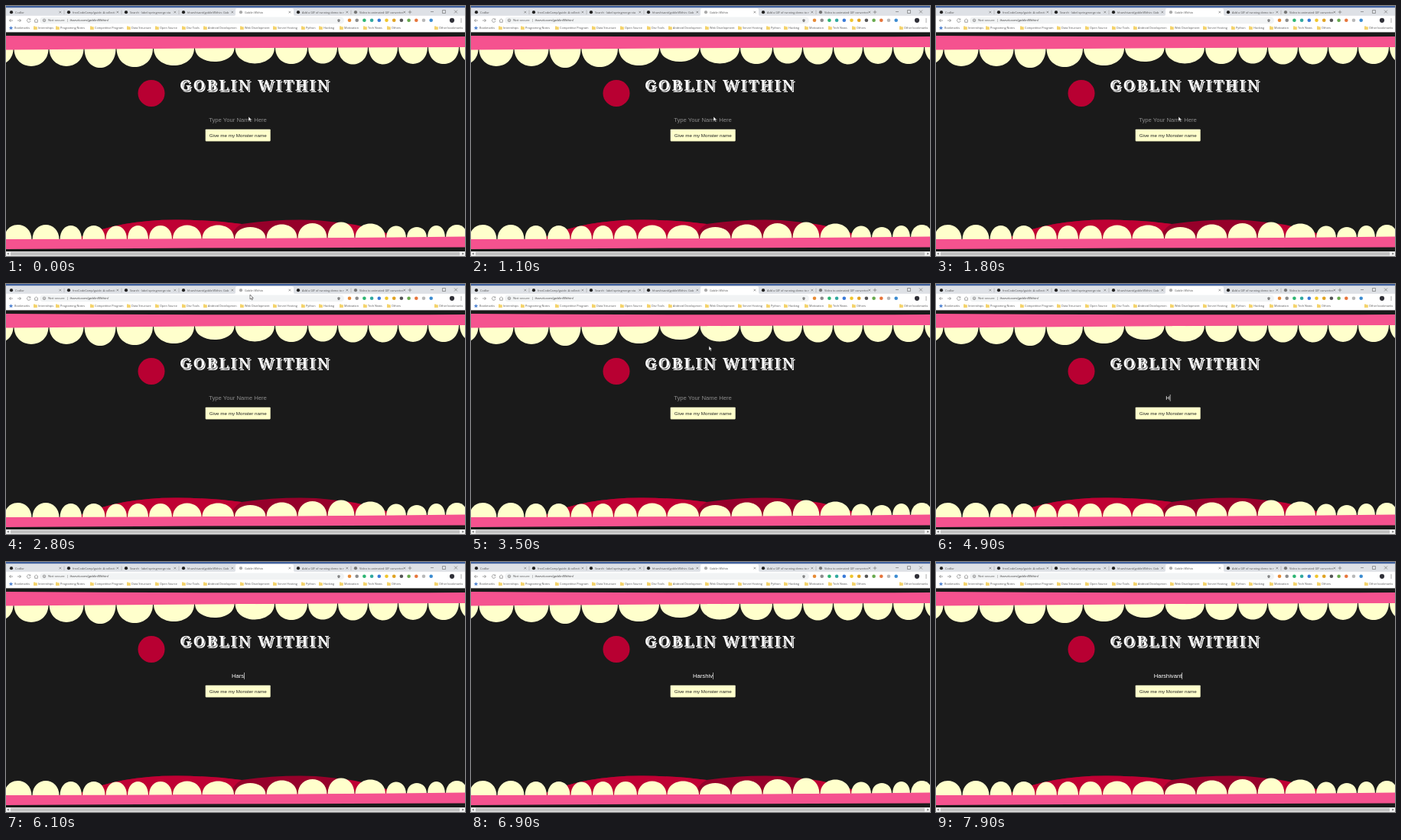
An HTML page for the animation above (8000 ms loop, 600x328 px).

```html
<!DOCTYPE html>
<html lang="en">
<head>
<meta charset="utf-8">
<title>Goblin Within</title>
<style>
  html, body { margin: 0; width: 100%; height: 100%; overflow: hidden; background: #1a1a1a; }
  svg { display: block; width: 100%; height: 100%; font-family: "Liberation Sans", Arial, sans-serif; }
  .ui { font-family: "Open Sans", "Noto Sans", sans-serif; font-size: 3.8px; fill: #555; }
  .title { font: 900 20px "Noto Serif", serif; letter-spacing: 2.2px; fill: #fff; }
  .title .face { stroke: #1a1a1a; stroke-width: 1; paint-order: stroke; }
  .field { font-size: 7.7px; text-anchor: middle; }
  .line { fill: none; stroke: #666; stroke-width: .6; }
</style>
</head>
<body>
<svg viewBox="0 0 600 328" preserveAspectRatio="none">
  <rect width="600" height="328" fill="#1a1a1a"/>

  <g id="browser">
    <rect width="600" height="13" fill="#dee1e6"/>
    <rect width="600" height="2.2" fill="#41629f"/>
    <path d="M298 13Q300 13 300 11V5Q300 3 302 3H374Q376 3 376 5V11Q376 13 378 13Z" fill="#fff"/>
    <rect y="12.8" width="600" height="21.6" fill="#fff"/>
    <rect x="44" y="14.4" width="398" height="8.8" rx="4.4" fill="#f1f3f4"/>
    <path class="line" d="M9 19H4.500M6.500 17L4.500 19L6.500 21M15 19H19.500M17.500 17L19.500 19L17.500 21M31.500 17.500A2.300 2.300 0 1 0 32 19.500M31.800 16.500V18H30.300M37 19L39.500 17L42 19M37.700 19V21.300H41.300V19"/>
    <path class="line" d="M528 5.700V10.300M525.700 8H530.300M555 7.500H559M570.500 5.500H574.500V9.500H570.500ZM586 5.500L590 9.500M590 5.500L586 9.500"/>
    <circle class="line" cx="50" cy="18.800" r="1.800"/>
    <path class="line" d="M50 18V20"/>
    <text class="ui" x="55" y="20.400" style="font-size:4.300px">Not secure&#160; |&#160; <tspan fill="#333">iharvit.com/goblinWithin/</tspan></text>
    <path class="line" d="M433 18.400H437L434 21L435 17L436 21Z"/>
    <circle cx="583" cy="18.800" r="3.100" fill="#303038"/>
    <path d="M595 16.500V21.500" stroke="#555" stroke-width="1" stroke-dasharray="1 1"/>
  </g>

  <g id="upper"></g>
  <path d="M0 39Q300 41 600 40V54Q300 54.500 0 57.500Z" fill="#f5528f"/>

  <path d="M98 303Q150 280 225 280.500Q270 281 308 286Q360 279 405 281Q460 285 503 300V308H98Z" fill="#96002a"/>
  <path d="M98 303Q150 280 225 280.500Q270 281 308 286Q296 292 292 308H98Z" fill="#bf0033"/>
  <path d="M436 284Q470 288 503 300V308H462Q452 294 436 284Z" fill="#bf0033"/>
  <g id="lower"></g>
  <path d="M0 306Q300 306 600 302.500V316.500Q300 317 0 319Z" fill="#f5528f"/>

  <circle cx="190" cy="114.500" r="17.500" fill="#b80032"/>
  <g class="title">
    <text x="228.500" y="112.500">GOBLIN WITHIN</text>
    <text class="face" x="227" y="111">GOBLIN WITHIN</text>
  </g>

  <text id="entry" class="field" x="303" y="152"></text>
  <rect id="caret" y="145" width=".7" height="8.800" fill="#ddd"/>
  <rect x="260.700" y="161.700" width="85" height="15.700" rx=".8" fill="#ffffcc"/>
  <text x="303.200" y="172" font-size="6.250" text-anchor="middle" fill="#222">Give me my Monster name</text>

  <g id="scrollbar">
    <rect y="322" width="600" height="6" fill="#f1f1f1"/>
    <rect x="6" y="322.700" width="587" height="4.600" fill="#c1c1c1"/>
    <path d="M3.500 323.500V326.500L1.500 325ZM596.500 323.500V326.500L598.500 325Z" fill="#555"/>
  </g>

  <path id="pointer" d="M0 0V6L1.400 4.800L2.400 7L3.400 6.500L2.500 4.400H4.300Z" fill="#fff" stroke="#111" stroke-width=".5"/>
</svg>

<script>
const $ = id => document.getElementById(id);

function add(parent, tag, attrs, text) {
  const node = document.createElementNS("http://www.w3.org/2000/svg", tag);
  for (const key in attrs) node.setAttribute(key, attrs[key]);
  if (text) node.textContent = text;
  return parent.appendChild(node);
}

// Tabs
const tabs = [
  ["Codlor", "#222"],
  ["freeCodeCamp/guide: A collecti", "#222"],
  ["Search · label:springmerge sta", "#222"],
  ["hharshivant/goblinWithin: Gob", "#222"],
  ["Goblin Within", "#aaa"],
  ["Add a GIF of running demo to r", "#222"],
  ["Video to animated GIF converter", "#777"]
];
tabs.forEach(([label, color], i) => {
  const x = 7 + 75 * i;
  add($("browser"), "circle", { cx: x, cy: 8.2, r: 2.1, fill: color });
  add($("browser"), "text", { class: "ui", x: x + 5, y: 9.7 }, label);
  add($("browser"), "path", { class: "line", d: `M${x + 62.5} 6.800l2.600 2.600m0-2.600l-2.600 2.600` });
  if (i < 3 || i === 5) add($("browser"), "path", { class: "line", d: `M${x + 69} 5.500v5.500`, opacity: .5 });
});

// Toolbar buttons
["#e78b36", "#8b8b8b", "#2eb573", "#30a8a0", "#3979d8", "#f0c52c", "#e0a323", "#555", "#68a94d", "#e6753c", "#b8b8b8", "#3b8bd0"]
  .forEach((fill, i) => add($("browser"), "circle", { cx: 449 + 9.7 * i, cy: 18.8, r: 2.3, fill }));

// Bookmarks
const bookmarks = [
  ["Bookmarks", 11], ["Internships", 42], ["Programing Notes", 71], ["Competitive Program", 116],
  ["Data Structure", 164], ["Open Source", 201], ["Dev Tools", 236], ["Android Developmen", 264],
  ["Web Development", 312], ["Server Hosting", 355], ["Python", 392], ["Hacking", 415],
  ["Motivation", 442], ["Tech News", 473], ["Others", 504], ["Other bookmarks", 566]
];
bookmarks.forEach(([label, x], i) => {
  const icon = i
    ? { d: `M${x - 6} 26.600h2l.6 .7h2.200v3.800h-4.800z`, fill: "#f4d36b" }
    : { d: "M6.500 26l.8 2h2l-1.600 1.300.6 2-1.800-1.200-1.800 1.200.6-2-1.600-1.300h2z", fill: "#4a7fd0" };
  add($("browser"), "path", icon);
  add($("browser"), "text", { class: "ui", x, y: 30.4 }, label);
});

// Teeth: neighbours share an edge; the last edge closes the row
const upperEdges = [-36, 10, 56, 102, 144, 192.5, 246.5, 299, 351.5, 394.5, 433.5, 473.5, 512.5, 551.5, 592.5, 634];
const upperTips = [78, 79, 79, 81, 80, 78, 73, 75.5, 76, 75.5, 76.5, 76.5, 76, 76, 76];
const lowerEdges = [-3, 34, 70, 99.5, 130, 158.5, 186.5, 217.5, 256, 298.5, 340, 381, 420, 456, 496.5, 523.5, 550.5, 574.5, 604];
const lowerTips = [287, 287, 288, 288, 288.5, 288, 288, 287.5, 287.5, 290, 286.5, 285, 283.5, 285.5, 288.5, 290, 288, 287];

function teeth(parent, edges, tips, baseAt) {
  tips.forEach((tip, i) => {
    const left = edges[i] + .5, right = edges[i + 1] - .5;
    const base = baseAt((left + right) / 2);
    const bend = base + (tip - base) * 4 / 3;
    add(parent, "path", {
      d: `M${left} ${base}C${left} ${bend} ${right} ${bend} ${right} ${base}Z`,
      fill: "#ffffcc"
    });
  });
}
teeth($("upper"), upperEdges, upperTips, x => 56 - x / 200);
teeth($("lower"), lowerEdges, lowerTips, x => 307 - x / 200);

// Motion
const LOOP = 8000;
const FOCUS = 4100;
const name = "Harshivant";
const keyTimes = [4800, 5200, 5600, 5900, 6300, 6600, 6900, 7200, 7500, 7700];
const path = [[0, 317, 145], [2200, 317, 145], [2700, 319, 14], [3200, 319, 14], [3800, 303, 148], [LOOP, 303, 148]];

function pointerAt(t) {
  const i = path.findIndex(step => step[0] > t);
  const [t0, x0, y0] = path[i - 1], [t1, x1, y1] = path[i];
  const p = (t - t0) / (t1 - t0), ease = p * p * (3 - 2 * p);
  return [x0 + (x1 - x0) * ease, y0 + (y1 - y0) * ease];
}

function draw(t) {
  const pressed = keyTimes.filter(key => key <= t);
  const typed = name.slice(0, pressed.length);
  const entry = $("entry");
  entry.textContent = typed || "Type Your Name Here";
  entry.setAttribute("fill", typed ? "#fff" : "#8c8c8c");

  const width = typed ? entry.getComputedTextLength() : 0;
  const lastInput = Math.max(FOCUS, ...pressed);
  const lit = t >= FOCUS && (t - lastInput) % 1000 < 500;
  $("caret").setAttribute("x", 303 + width / 2);
  $("caret").setAttribute("visibility", lit ? "visible" : "hidden");

  $("pointer").setAttribute("transform", `translate(${pointerAt(t)})`);
  $("pointer").setAttribute("visibility", t < FOCUS ? "visible" : "hidden");
}

const start = performance.now();
function tick() {
  draw((performance.now() - start) % LOOP);
  requestAnimationFrame(tick);
}
tick();
</script>
</body>
</html>
```
